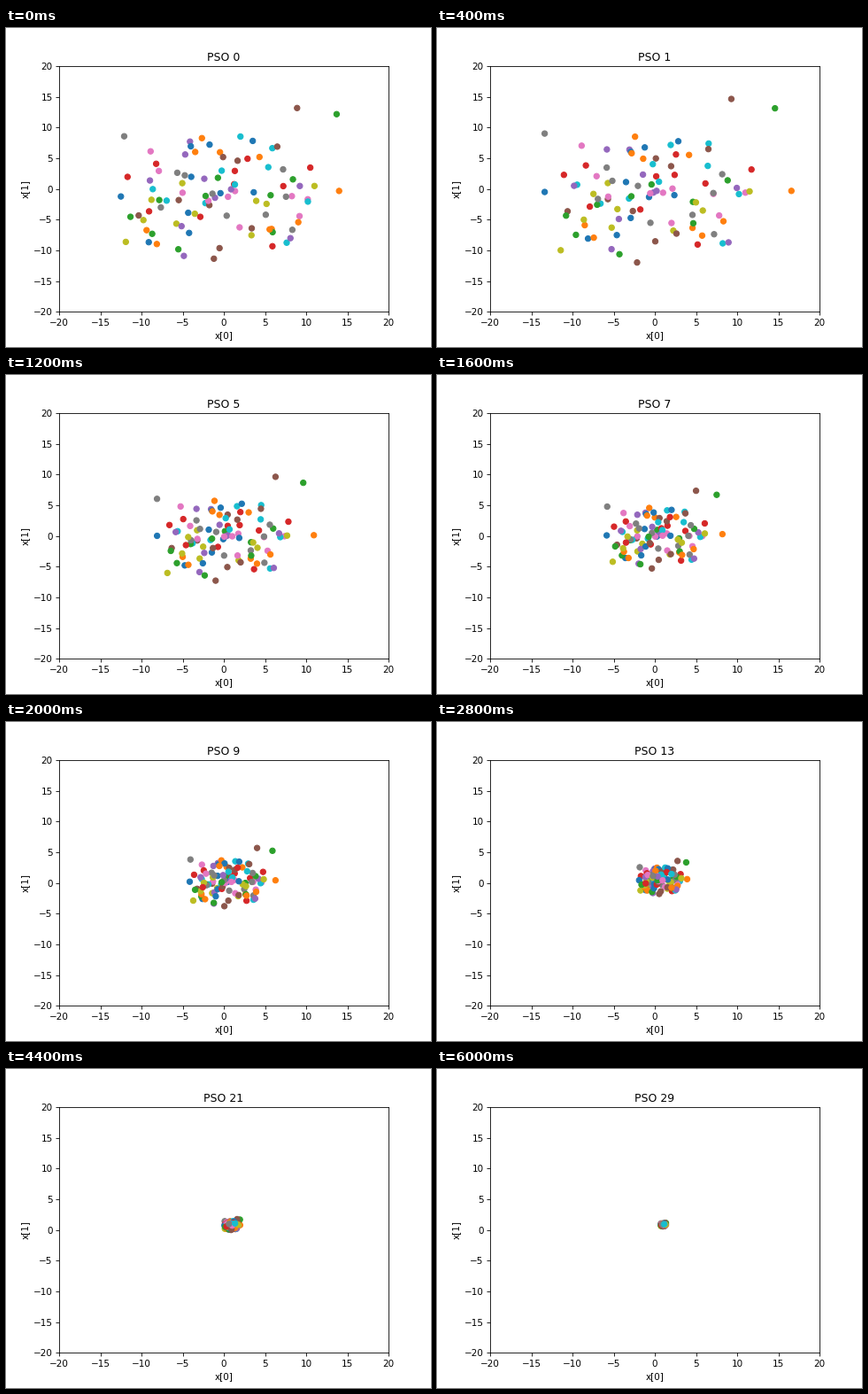
Animation of 480x360 px, one loop 6200 ms. Source, as a matplotlib script:

```python
import matplotlib.pyplot as plt
import numpy as np
from matplotlib.animation import FuncAnimation

COUNT = 100
LAST_STEP = 29
INTERVAL = 200
GOAL = np.array([1.05, 0.9])
DECAY = 0.87

# Stray particles outside the crowd: (x, y, x velocity, y velocity)
STRAYS = {
    1: (14.0, -0.3, 3.4, 0.1),
    2: (13.7, 12.2, 0.6, 0.8),
    3: (10.5, 3.5, 1.4, -0.7),
    5: (8.9, 13.2, 0.1, 1.6),
    7: (-12.1, 8.6, -1.2, 0.2),
    8: (-11.9, -8.6, 1.7, -1.6),
}

# The crowd fills an ellipse, denser towards its middle
rng = np.random.default_rng(7)
angle = rng.uniform(0, 2 * np.pi, COUNT)
radius = 12.3 * rng.uniform(0, 1, COUNT) ** 0.62
start = np.column_stack([radius * np.cos(angle) - 0.6,
                         0.85 * radius * np.sin(angle) - 1.4])
kick = rng.uniform(-2.2, 2.2, start.shape) - 0.1 * (start - GOAL)
for i, (x, y, vx, vy) in STRAYS.items():
    start[i], kick[i] = (x, y), (vx, vy)


def swarm(n):
    """Positions after n steps: a decaying pull to the goal plus a fading drift."""
    pull = DECAY**n * (1.33 - 0.33 * 0.4**n)
    drift = n * 0.6**n
    return GOAL + (start - GOAL) * pull + kick * drift


fig, ax = plt.subplots(figsize=(6.4, 4.8), dpi=75)
dots = ax.scatter(*start.T, c=[f"C{i % 10}" for i in range(COUNT)],
                  s=36, linewidths=1)
title = ax.set_title("PSO 0")
ticks = range(-20, 21, 5)
ax.set(xlim=(-20, 20), ylim=(-20, 20), xlabel="x[0]", ylabel="x[1]",
       xticks=ticks, yticks=ticks)


def update(frame):
    n = max(frame - 1, 0)  # the opening state is held for two frames
    dots.set_offsets(swarm(n))
    title.set_text(f"PSO {n}")
    return dots, title


anim = FuncAnimation(fig, update, frames=LAST_STEP + 2, interval=INTERVAL,
                     repeat=True, repeat_delay=0, blit=False)
plt.show()
```
